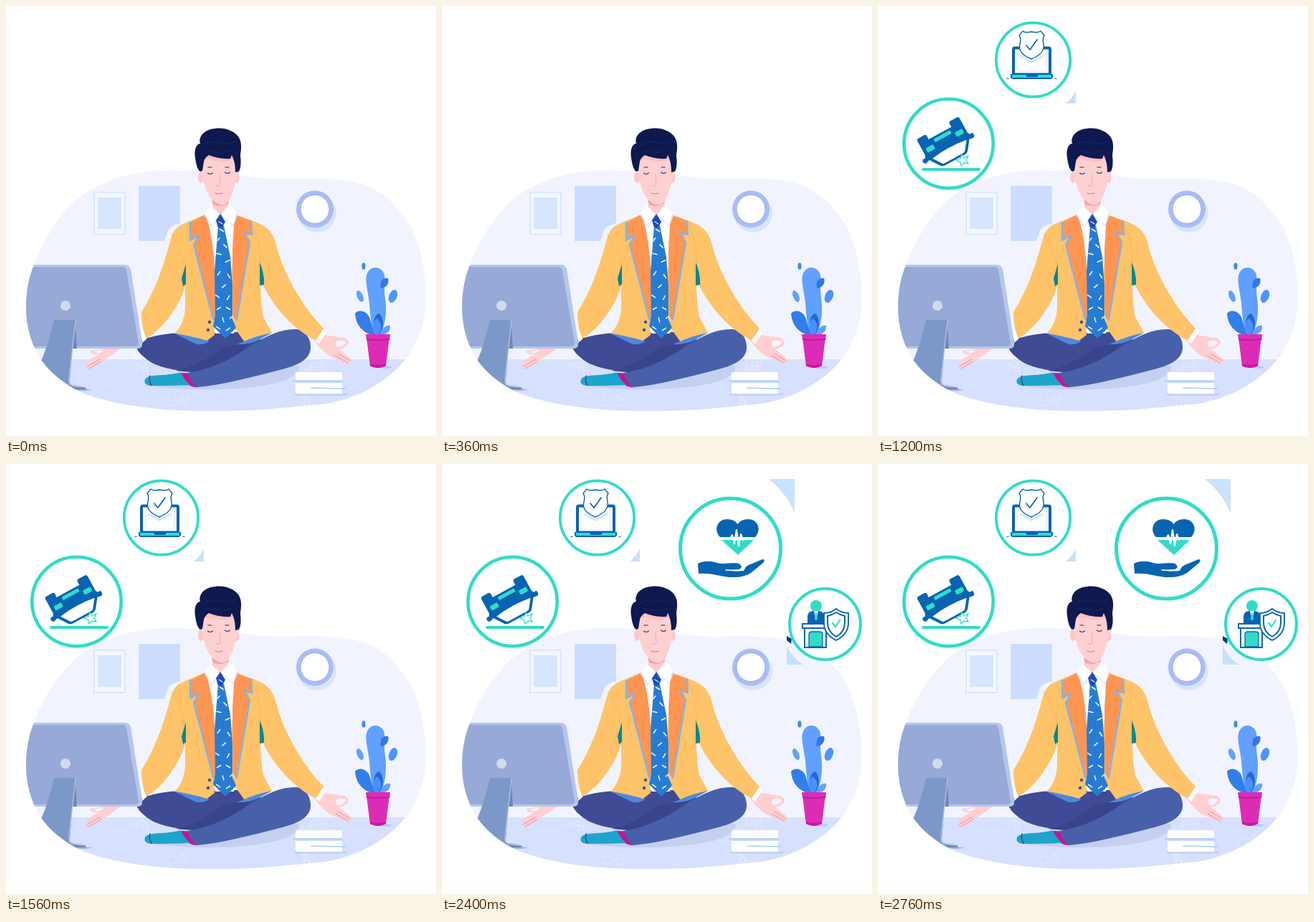
These frames come from a looping animation (600x600 px, 3000 ms). An HTML page:

```html
<!DOCTYPE html>
<html lang="en">
<head>
<meta charset="utf-8">
<title>Calm at the office</title>
<style>
html, body { margin: 0; width: 100%; height: 100%; overflow: hidden; background: #fff; }
svg { display: block; width: 100vw; height: 100vh; }
.line { fill: none; stroke-linecap: round; stroke-linejoin: round; }
.badge { fill: #fff; stroke: #30dcc8; }
.navy { fill: #0864b1; }
.teal { fill: #30dcc8; }
</style>
</head>
<body>
<svg viewBox="0 0 600 600" xmlns="http://www.w3.org/2000/svg">
<defs>
  <path id="blob" d="M28 420C28 399 32 378 39 361C51 327 72 295 99 270C126 247 165 234 205 230C250 227 290 232 327 236C350 239 366 242 390 241C430 240 462 240 492 247C525 255 549 281 566 310C579 338 586 375 586 408C586 442 574 474 553 498C527 528 487 548 445 555C400 559 355 565 300 565C235 566 172 561 121 545C89 535 61 513 46 489C34 468 28 445 28 420Z"/>
  <clipPath id="room"><use href="#blob"/></clipPath>
  <clipPath id="tieShape"><use href="#tie"/></clipPath>
</defs>

<!-- room -->
<use href="#blob" fill="#f1f4ff"/>
<g clip-path="url(#room)">
  <path d="M0 493H600V600H0Z" fill="#d7e0ff"/>
  <path d="M123 260H166V319H123Z" fill="#f4f7ff" stroke="#d5e4fc" stroke-width="1.6"/>
  <path d="M128 267H161V311H128Z" fill="#d8e5ff"/>
  <path d="M185 251H243V303Q230 306 226 313L221 328H185Z" fill="#ccdcff"/>
  <g id="specks" fill="#e5ebff"/>
  <path d="M205 531Q310 541 378 526Q408 517 410 503L390 497Z" fill="#c5cff0"/>
</g>
<circle cx="434" cy="289" r="27" fill="#d9e4ff"/>
<circle cx="431" cy="283.500" r="26" fill="#a9bcf8"/>
<circle cx="431" cy="283.500" r="20" fill="#fff" stroke="#98abed" stroke-width="1"/>

<!-- plant -->
<path d="M515 504Q533 508 539 504Q533 501 515 502Z" fill="#bac9f4"/>
<g fill="#61a0ff">
  <path d="M512 459C510 445 508 430 507 414C505 398 501 385 503 376C506 365 515 363 522 367C529 371 529 380 528 389C527 402 531 412 530 425C530 440 526 451 523 459Z"/>
  <ellipse cx="499" cy="363" rx="2.600" ry="4.700" fill="#4189f3"/>
  <ellipse cx="494" cy="405" rx="4" ry="8.500" transform="rotate(-24 494 405)"/>
  <ellipse cx="540" cy="405" rx="5.500" ry="9.500" transform="rotate(22 540 405)" fill="#4d94fb"/>
  <path d="M523 394C521 383 526 379 533 380C535 387 531 393 523 394Z" fill="#3278e4"/>
  <path d="M511 459C498 456 488 445 487 429C493 422 505 426 508 437Q510 446 515 459Z" fill="#327eeb"/>
  <path d="M516 459C511 442 513 431 521 429C528 437 527 449 521 459Z" fill="#2468d0"/>
  <path d="M516 459C511 452 510 444 517 436C525 441 525 450 520 459Z" fill="#4991fa"/>
  <path d="M523 459C525 449 530 445 536 446C537 453 532 457 526 459Z"/>
</g>
<path d="M503 463H535L530 502Q519 508 508 502Z" fill="#dc2cb5"/>
<path d="M502 458H536L535 466Q518 469 503 466Z" fill="#dc2cb5"/>
<path d="M504 465Q518 467 535 465" class="line" stroke="#bc1594" stroke-width="1.500"/>
<path d="M508 499Q519 503 530 499L530 502Q519 508 508 502Z" fill="#c8189c"/>

<!-- books -->
<path d="M401 540H478L475 544H404Z" fill="#c8d3f3"/>
<path d="M404 511H469V523H404ZM404 526H469V541H404Z" fill="#fff"/>
<path d="M404 523H470V526H404Z" fill="#cbd8fa"/>
<path d="M401 523H469M426 533L473 534" class="line" stroke="#a9cdf5" stroke-width="1.300"/>

<!-- hands -->
<g fill="#ffcfd1">
  <path d="M159 478C148 488 140 492 133 496L114 507Q111 507 114 503L112 501Q111 498 116 494L129 486Q117 487 118 481L136 478Z"/>
  <path d="M438 457C450 460 463 462 473 463Q481 468 476 474Q471 478 465 479L480 491L482 498Q482 501 477 499L459 492Q445 487 431 468Z"/>
</g>
<path d="M122 482Q131 488 136 479ZM462 476Q458 469 463 467Q474 466 474 470Q471 475 462 476Z" fill="#f1f4ff"/>
<path d="M113 503L131 493M116 506L133 496M464 485L480 495M460 488L477 498" class="line" stroke="#ef8f98"/>

<!-- legs -->
<path d="M190 466C210 458 230 457 252 455L330 455L366 470L296 512C256 511 214 509 194 491C184 483 178 474 182 464Z" fill="#3f4b94"/>
<path d="M237 509Q272 501 303 476L341 470L310 500L270 512Z" fill="#38448b"/>
<path d="M253 512C287 507 315 492 342 474C364 459 386 450 406 451C419 453 426 466 425 478C424 492 410 500 389 506C350 516 303 529 266 532Q255 528 249 513Z" fill="#4860aa"/>
<path d="M244 512Q251 511 255 515Q258 526 267 532Q259 532 254 528Q246 521 244 512Z" fill="#c21693"/>
<path d="M194 521C198 515 207 516 216 515Q233 514 244 511Q247 520 257 529Q231 530 205 530C195 530 192 526 194 521Z" fill="#1ca5cb"/>
<path d="M201 516Q199 523 203 529" class="line" stroke="#643398" stroke-width="1.500"/>

<!-- torso -->
<path d="M282 287L320 287L330 410L318 457H292L275 410Z" fill="#fff"/>
<path d="M278 291C260 299 246 303 239 309Q232 315 228 332C219 365 208 397 189 427Q189 450 196 464C210 456 225 440 235 423Q246 407 250 390L250 422Q248 445 235 457Q258 461 278 469L291 459L289 420Z" fill="#ffc369"/>
<path d="M320 291C343 299 358 304 365 311Q373 318 377 333C381 352 392 377 406 401Q421 427 443 450L432 467C411 456 389 437 374 415Q361 397 355 380Q355 416 359 434L371 456Q348 462 333 469L318 448L313 400Z" fill="#ffc369"/>
<path d="M251 360L245 380L247 391L251 388ZM354 357Q361 375 360 389L354 390Z" fill="#06878f"/>
<path d="M231 318Q243 338 251 361M342 302Q357 329 355 360" class="line" stroke="#f4b65a" stroke-width=".9"/>
<path d="M432 467L443 451L447 456L437 471ZM190 450L196 465L190 470Z" fill="#fff"/>
<path d="M235 457Q258 460 284 468Q276 473 266 472ZM371 456Q349 460 330 469L322 472Q338 473 353 466Z" fill="#4c89dc"/>
<path d="M278 291L257 302V328L268 322L262 333L290 440L294 432Q294 390 291 365Q288 315 278 291ZM319 291L342 300L343 320L333 318L340 330L321 438L317 432L316 340Z" fill="#ff9553"/>
<path d="M257 302V327L269 320L262 333L289 437M342 300L343 319L333 316L340 330L322 438" class="line" stroke="#79b4f2" stroke-width="2.200"/>
<circle cx="284" cy="441" r="2.200" fill="#3657a7"/><circle cx="282" cy="452" r="2.200" fill="#3657a7"/>
<path d="M288 269V285L300 293L311 283V266Z" fill="#ffcccd"/>
<path d="M287 270Q298 280 312 267L310 275Q300 282 289 277Z" fill="#f5a39f"/>
<path d="M286 279L299 291L287 309L277 289ZM312 276L300 291L317 307L322 288Z" fill="#fff"/>
<path d="M277 291L287 308L298 293M301 293L317 306L323 290" class="line" stroke="#dbe8f7" stroke-width="1.600"/>
<path id="tie" d="M296 307L304 307L313 350L316 390V437L321 449L306 464L289 447L292 432L291 370Z" fill="#277cd2"/>
<path d="M299 290L306 301L302 309H296L293 299Z" fill="#1f4bbb"/>
<g id="dashes" clip-path="url(#tieShape)" class="line" stroke="#f1f7ff" stroke-width="1.500"/>
<path d="M297 301L302 304" class="line" stroke="#e9f3ff" stroke-width="1.200"/>

<!-- head -->
<ellipse cx="272" cy="239" rx="4" ry="8" fill="#ffc7c9"/><ellipse cx="322" cy="239" rx="3.500" ry="8" fill="#ffc7c9"/>
<path d="M274 207H322V238C319 252 315 272 306 276Q298 280 290 272C281 265 275 249 274 231Z" fill="#ffd0d2"/>
<path d="M275 222L278 215Q285 212 297 217Q308 218 316 214L321 222V207H275Z" fill="#fbbfc3"/>
<path d="M271 231Q266 228 264 212C262 200 266 192 271 192C268 181 278 172 292 171C304 169 318 174 324 182C330 190 328 201 327 208Q329 224 325 231L320 232Q320 217 315 208L313 213Q297 214 283 208Q277 212 276 217L274 230Z" fill="#0e194f"/>
<path d="M276 194Q287 187 301 191Q314 194 322 188M280 201Q297 207 314 202" class="line" stroke="#1d2b69" stroke-width=".8"/>
<path d="M282 225L287 225M306 225L311 225" class="line" stroke="#26285e" stroke-width="1.200"/>
<path d="M281.500 233Q285 236 288.500 233M305.500 232Q309 235 312.500 232" class="line" stroke="#3d345f" stroke-width="1.100"/>
<path d="M298 235L299 249Q297 253 293 250" class="line" stroke="#f3aaae" stroke-width="1.100"/>
<path d="M292 261Q297 263 302 261" class="line" stroke="#e5737c" stroke-width="1.200"/>

<!-- computer -->
<g clip-path="url(#room)">
  <path d="M80 532L121 535L112 537H75Z" fill="#a4b8e4"/>
  <path d="M20 361H166Q172 361 174 367L190 470Q191 478 183 478H20Z" fill="#b5c5ee"/>
  <path d="M20 364H162Q167 364 168 369L185 470Q186 475 179 475H20Z" fill="#97a9d6"/>
  <circle cx="83" cy="418" r="7" fill="#d2daee"/>
  <path d="M96 438L99 478H92L88 525Q88 530 108 531Q113 533 111 535H88Z" fill="#7186b7"/>
  <path d="M67 438H97Q93 475 88 520Q88 535 100 535H30L50 493Q59 472 67 438Z" fill="#7c98c9"/>
  <path d="M97 439Q93 476 88 520Q87 530 96 531L109 532" class="line" stroke="#aebfe3" stroke-width="1.500"/>
</g>

<!-- car -->
<g id="car">
  <circle class="badge" cx="98.500" cy="192" r="62.200" stroke-width="4.600"/>
  <g transform="translate(90 188) rotate(-28.500)">
    <path class="navy" d="M-31 -16Q-31 -19 -28 -19H-19Q-16 -19 -16 -16V-11H20V-16Q20 -19 23 -19H33Q36 -19 36 -16V7L38 10H42Q44 17 39 17L34 16L25 28Q22 32 18 32H-13Q-18 32 -20 28L-29 15L-35 17Q-40 15 -37 10H-33L-31 6Z"/>
    <path d="M-24 15Q3 11 30 15L21 27Q20 29 17 29H-12Q-15 29 -16 27Z" fill="#fff"/>
    <rect class="teal" x="-10" y="-8" width="26" height="5" rx="1"/>
    <rect class="teal" x="-26" y="-2" width="12" height="7" rx="2"/>
    <rect class="teal" x="20" y="-2" width="12" height="7" rx="2"/>
  </g>
  <path d="M117 207L120 212L126 209L123 215L126 220L120 219L116 223L115 218L109 215L115 213Z" fill="#fff" stroke="#30dcc8" stroke-width="1.300"/>
  <path d="M63 228H141" class="line" stroke="#30dcc8" stroke-width="4"/>
</g>

<!-- laptop -->
<g id="laptop">
  <path d="M262 136Q271 129 276 118V136Z" fill="#c9e0fb"/>
  <circle class="badge" cx="216.500" cy="75" r="51.700" stroke-width="3.800"/>
  <rect x="189" y="58.500" width="51" height="37" rx="2" fill="#fff" stroke="#0864b1" stroke-width="4"/>
  <path d="M195 65V91H235V65" class="line" stroke="#d9eafa"/>
  <path d="M185 95H244V99Q243 102 240 102H189Q185 102 185 99Z" class="navy"/>
  <path d="M187 96H242V100H187Z" class="teal"/>
  <path d="M206 96H224L222 99H208Z" class="navy"/>
  <path d="M180 101.500H182M247 101.500H249" class="line" stroke="#0864b1" stroke-width="1.200"/>
  <path d="M198 68Q205 70 214 77Q224 70 231 68V71L214 80L198 71Z" fill="#d2e8fb"/>
  <path d="M202 35Q205 38 214 36Q223 38 227 35L232 41Q229 45 231 53C233 64 224 70 214 74C204 70 195 64 198 53Q200 45 197 41Z" fill="#fff" stroke="#0864b1" stroke-width="1.400"/>
  <path d="M207 55L212 61L222 47" class="line" stroke="#0864b1" stroke-width="1.700"/>
</g>

<!-- heart -->
<g id="heart">
  <path d="M456 21H492V69Q482 42 456 21Z" fill="#c9e2fd"/>
  <circle class="badge" cx="402.500" cy="118" r="70" stroke-width="5"/>
  <path class="navy" d="M388 102C378 91 385 77 398 77Q408 77 412.500 84Q417 77 427 77C440 77 447 91 437 102Z"/>
  <path class="teal" d="M390 106H435L413 127Z"/>
  <path d="M388 104H402L405 99L408 111L411 92L414 114L417 98L420 106L422 104H438" class="line" stroke="#fff" stroke-width="2.200"/>
  <path class="navy" d="M357 139C365 135 374 135 384 138C394 141 407 136 417 140Q421 144 415 147L397 148Q407 151 421 149Q424 141 433 139L447 133Q452 133 448 138L431 152Q421 158 408 158C393 159 377 151 358 153Z"/>
  <path d="M396 148Q409 149 416 147Q421 143 416 140" class="line" stroke="#fff" stroke-width="1.300"/>
</g>

<!-- desk -->
<g id="desk">
  <path d="M481 253Q488 270 504 280H481Z" fill="#c9e0fb"/>
  <path d="M481 240L488 244L487 251L481 246Z" fill="#123b72"/>
  <circle class="badge" cx="534.500" cy="223.500" r="49.500" stroke-width="4"/>
  <circle class="teal" cx="522" cy="198" r="8"/>
  <path class="navy" d="M510 222V212Q511 205 519 205H525Q532 205 533 212V222Z"/>
  <path d="M519 205H525L522 219Z" fill="#fff"/><path class="teal" d="M521 208H523L524 216L522 219L520 216Z"/>
  <path d="M503 223H537V229H503ZM506 229H536V256H506Z" fill="#fff" stroke="#0864b1" stroke-width="2"/>
  <path d="M512 255V238Q512 234 516 234H527Q531 234 531 238V255Z" class="teal" stroke="#0864b1" stroke-width="1.300"/>
  <path d="M550 202Q557 208 567 208V222C567 234 560 241 550 246C540 241 533 234 533 222V208Q543 208 550 202Z" fill="#fff" stroke="#0864b1" stroke-width="1.800"/>
  <path d="M550 207Q556 211 562 212V222C562 231 557 237 550 241C543 237 538 231 538 222V212Q544 211 550 207Z" fill="#fff" stroke="#0864b1" stroke-width="2"/>
  <path d="M545 222L549 227L555 218" class="line" stroke="#30dcc8" stroke-width="2.200"/>
</g>
</svg>
<script>
const LOOP = 3000, STEP = 600;
const byId = id => document.getElementById(id);
const badges = ['car', 'laptop', 'heart', 'desk'].map(byId);

let seed = 7;
function rand() {
  seed = (seed * 16807) % 2147483647;
  return seed / 2147483647;
}

// soft grain on the floor
function grain(cx, cy, w, h) {
  let out = '';
  for (let i = 0; i < 32; i++) {
    const x = cx + (rand() - 0.5) * w, y = cy + (rand() - 0.5) * h;
    out += `<circle cx="${x.toFixed(1)}" cy="${y.toFixed(1)}" r="1"/>`;
  }
  return out;
}
byId('specks').innerHTML = grain(187, 504, 24, 16) + grain(240, 550, 32, 18)
  + grain(433, 503, 30, 14) + grain(420, 550, 12, 14);

// tie pattern: x, y, angle
const dashes = [
  [301, 313, 30], [296, 326, -50], [306, 335, 45], [297, 346, 15], [309, 356, -25],
  [297, 373, -55], [311, 377, 55], [304, 391, -40], [295, 405, 35], [310, 407, -60],
  [297, 422, -30], [310, 422, 30], [303, 438, 75], [315, 434, -40], [296, 449, 35], [310, 451, -35]
];
byId('dashes').innerHTML = dashes.map(([x, y, a]) =>
  `<path d="M-3 0H3" transform="translate(${x} ${y}) rotate(${a})"/>`).join('');

function draw(time) {
  const step = Math.floor((time % LOOP) / STEP);
  badges.forEach((el, i) => el.setAttribute('display', i < step ? 'inline' : 'none'));
}

const start = performance.now();
function tick(now) {
  draw(Math.max(0, now - start));
  requestAnimationFrame(tick);
}
draw(0);
requestAnimationFrame(tick);
</script>
</body>
</html>
```
